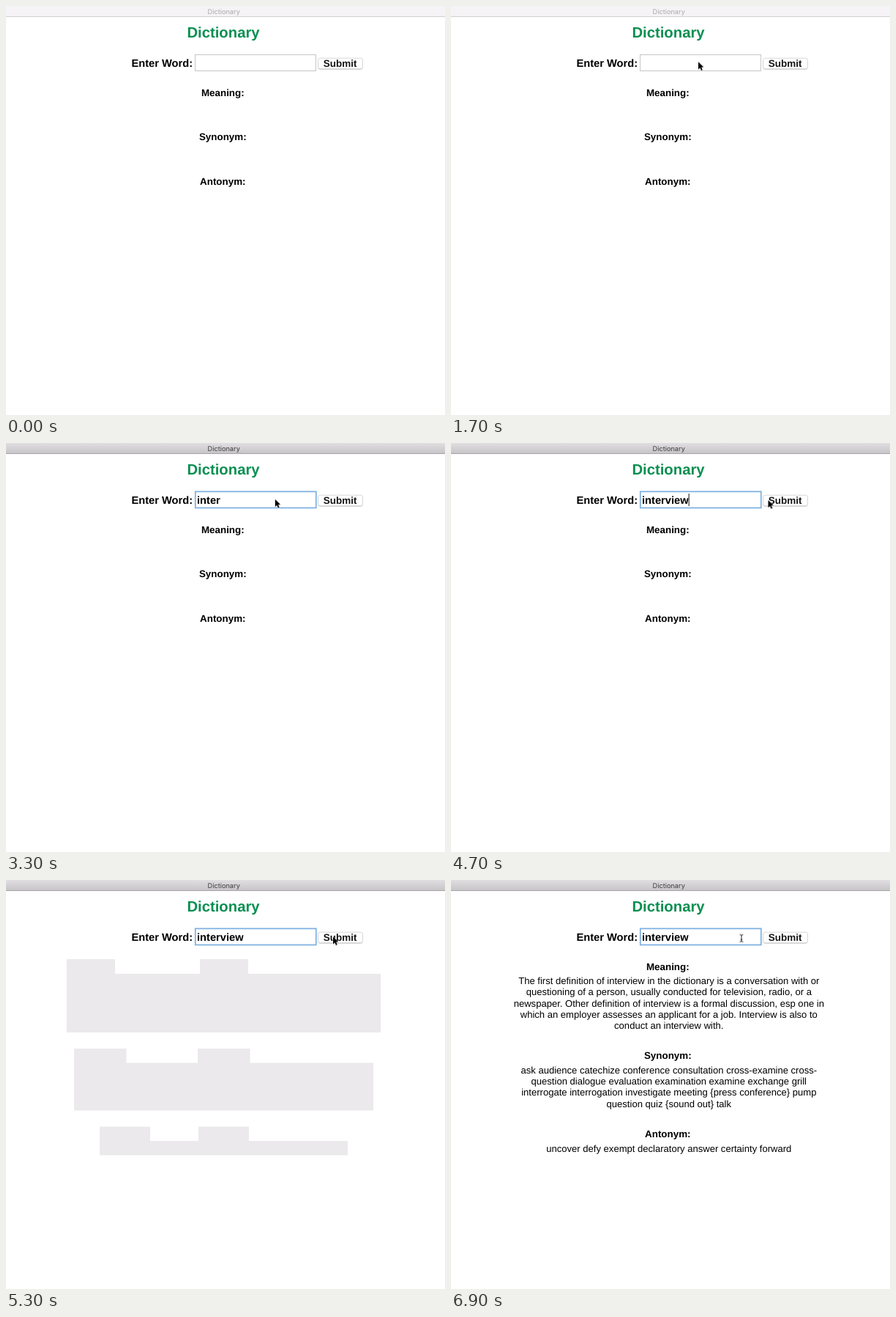
An HTML page for the animation above (7 s loop, 600 by 558 pixels).

```html
<!DOCTYPE html>
<html lang="en">
<head>
<meta charset="utf-8">
<title>Dictionary</title>
<style>
html, body { margin: 0; width: 100%; height: 100%; overflow: hidden; background: #fff; }
svg { display: block; width: 100%; height: 100%; }
text { font: 13.05px "Liberation Sans", Arial, sans-serif; text-anchor: middle; text-rendering: geometricPrecision; fill: #000; }
.bar { font: 9.2px Inter, sans-serif; }
.head { font-size: 20.3px; font-weight: bold; fill: #0a8f51; }
.big { font-size: 14.7px; font-weight: bold; text-anchor: start; }
.label { font-size: 13.4px; font-weight: bold; }
.submit { font-size: 13.5px; font-weight: bold; fill: #161616; }

.focus, .idle, .loading, .result, .typed, .caret, .pointer, .arrow, .beam {
  animation-duration: 7s;
  animation-iteration-count: infinite;
  animation-timing-function: step-end;
}
.focus { animation-name: focus; }
.idle { animation-name: idle; }
.loading { animation-name: loading; }
.result { animation-name: result; }
.typed { animation-name: type; }
.caret { animation-name: blink; }
.pointer { animation-name: move; animation-timing-function: ease-in-out; }
.arrow { animation-name: arrow; }
.beam { animation-name: beam; }

@keyframes focus { 0% { opacity: 0 } 25.71%, 100% { opacity: 1 } }
@keyframes idle { 0% { opacity: 1 } 75.71%, 100% { opacity: 0 } }
@keyframes loading { 0% { opacity: 0 } 75.71% { opacity: 1 } 77.14%, 100% { opacity: 0 } }
@keyframes result { 0% { opacity: 0 } 77.14%, 100% { opacity: 1 } }
@keyframes arrow { 0% { opacity: 0 } 14.28% { opacity: 1 } 95.7%, 100% { opacity: 0 } }
@keyframes beam { 0% { opacity: 0 } 95.7%, 100% { opacity: 1 } }
@keyframes blink {
  0%, 34.28%, 47.14%, 60%, 72.85%, 85.71%, 98.57%, 100% { opacity: 0 }
  25.71%, 38.57%, 51.42%, 64.28%, 77.14%, 90% { opacity: 1 }
}
@keyframes type {
  0% { transform: translateX(0) }
  35.7% { transform: translateX(4.1px) }
  38.5% { transform: translateX(13.1px) }
  41.4% { transform: translateX(18px) }
  44.2% { transform: translateX(26.1px) }
  47.1% { transform: translateX(31.9px) }
  49.9% { transform: translateX(40px) }
  52.8% { transform: translateX(44.1px) }
  55.7% { transform: translateX(52.3px) }
  58.5%, 100% { transform: translateX(63.7px) }
}
@keyframes move {
  0%, 14.28% { transform: translate(431px, 468px); animation-timing-function: ease-out }
  24.28%, 28.5% { transform: translate(338px, 76.3px) }
  34.2%, 59.9% { transform: translate(367.8px, 76.8px) }
  67.1% { transform: translate(433px, 78px); animation-timing-function: ease-out }
  69.9%, 82.8% { transform: translate(447px, 77.3px) }
  92.8% { transform: translate(444px, 77.3px) }
  97.1%, 100% { transform: translate(397px, 79.5px) }
}
</style>
</head>
<body>
<svg viewBox="0 0 600 558" preserveAspectRatio="none">
  <defs>
    <linearGradient id="chrome" x2="0" y2="1">
      <stop stop-color="#e0dee0"/>
      <stop offset="1" stop-color="#c7c5c7"/>
    </linearGradient>
  </defs>
  <rect width="600" height="558" fill="#fff"/>

  <!-- window bar -->
  <rect width="600" height="14" fill="#f5f3f5"/>
  <rect y="14" width="600" height="1" fill="#d2d0d2"/>
  <text class="bar" x="297.7" y="10.8" style="fill:#aaa8aa">Dictionary</text>
  <g class="focus">
    <rect width="600" height="14" fill="url(#chrome)"/>
    <rect y="14" width="600" height="1" fill="#a6a4a6"/>
    <text class="bar" x="297.7" y="10.8" style="fill:#3c3b3c">Dictionary</text>
  </g>

  <!-- form -->
  <text class="head" x="297" y="43.4">Dictionary</text>
  <text class="big" x="171.4" y="82.7">Enter Word:</text>
  <rect x="258.5" y="66.5" width="165" height="22" fill="#fff" stroke="#c6c6c6"/>
  <rect class="focus" x="258.8" y="66.3" width="165" height="22.2" fill="#fff" stroke="#82b2e2" stroke-width="1.8"/>
  <text class="big" x="261" y="82.7">interview</text>
  <g class="typed">
    <rect x="261.2" y="69" width="68" height="17" fill="#fff"/>
    <rect class="caret" x="324.5" y="69" width="1" height="17" fill="#000" style="transform:translateX(-63.5px)"/>
  </g>
  <rect x="426.5" y="71.7" width="61" height="15" rx="3" fill="#c9c9c9"/>
  <rect x="426.5" y="71.2" width="61" height="14.6" rx="3" fill="#fff" stroke="#cfcfcf" stroke-width=".8"/>
  <text class="submit" x="456.6" y="82.7">Submit</text>

  <!-- answers -->
  <g class="idle">
    <text class="label" x="296.3" y="122.5">Meaning:</text>
    <text class="label" x="296.3" y="183.4">Synonym:</text>
    <text class="label" x="296.3" y="244.3">Antonym:</text>
  </g>
  <path class="loading" fill="#ebe9eb" d="M83 108H149V128H265V108H331V128H512V208H83Z M93 230H164.5V249.5H262V230H333.5V249.5H502V314.5H93Z M128 336.5H197V356H263V336.5H332V356H467V375.5H128Z"/>
  <g class="result">
    <text class="label" x="296.3" y="122.5">Meaning:</text>
    <text x="297.8" y="142.2">The first definition of interview in the dictionary is a conversation with or</text>
    <text x="297.8" y="157.4">questioning of a person, usually conducted for television, radio, or a</text>
    <text x="297.8" y="172.6">newspaper. Other definition of interview is a formal discussion, esp one in</text>
    <text x="297.8" y="187.8">which an employer assesses an applicant for a job. Interview is also to</text>
    <text x="297.8" y="203">conduct an interview with.</text>
    <text class="label" x="296.3" y="244.3">Synonym:</text>
    <text x="297.8" y="264">ask audience catechize conference consultation cross-examine cross-</text>
    <text x="297.8" y="279.2">question dialogue evaluation examination examine exchange grill</text>
    <text x="297.8" y="294.4">interrogate interrogation investigate meeting {press conference} pump</text>
    <text x="297.8" y="309.6">question quiz {sound out} talk</text>
    <text class="label" x="296.3" y="350.8">Antonym:</text>
    <text x="297.8" y="370.5">uncover defy exempt declaratory answer certainty forward</text>
  </g>

  <!-- mouse -->
  <g class="pointer">
    <path class="arrow" d="M0 0V10.2L2.4 8L4 11.8L5.8 11L4.2 7.3H7.4Z" fill="#000" stroke="#fff" stroke-width="1" paint-order="stroke"/>
    <path class="beam" d="M-2.4 -5Q0 -5 0 -3.6Q0 -5 2.4 -5M0 -3.8V3.8M-2.4 5Q0 5 0 3.6Q0 5 2.4 5M-1.3 1.8H1.3" fill="none" stroke="#222" stroke-width="1"/>
  </g>
</svg>
</body>
</html>
```
